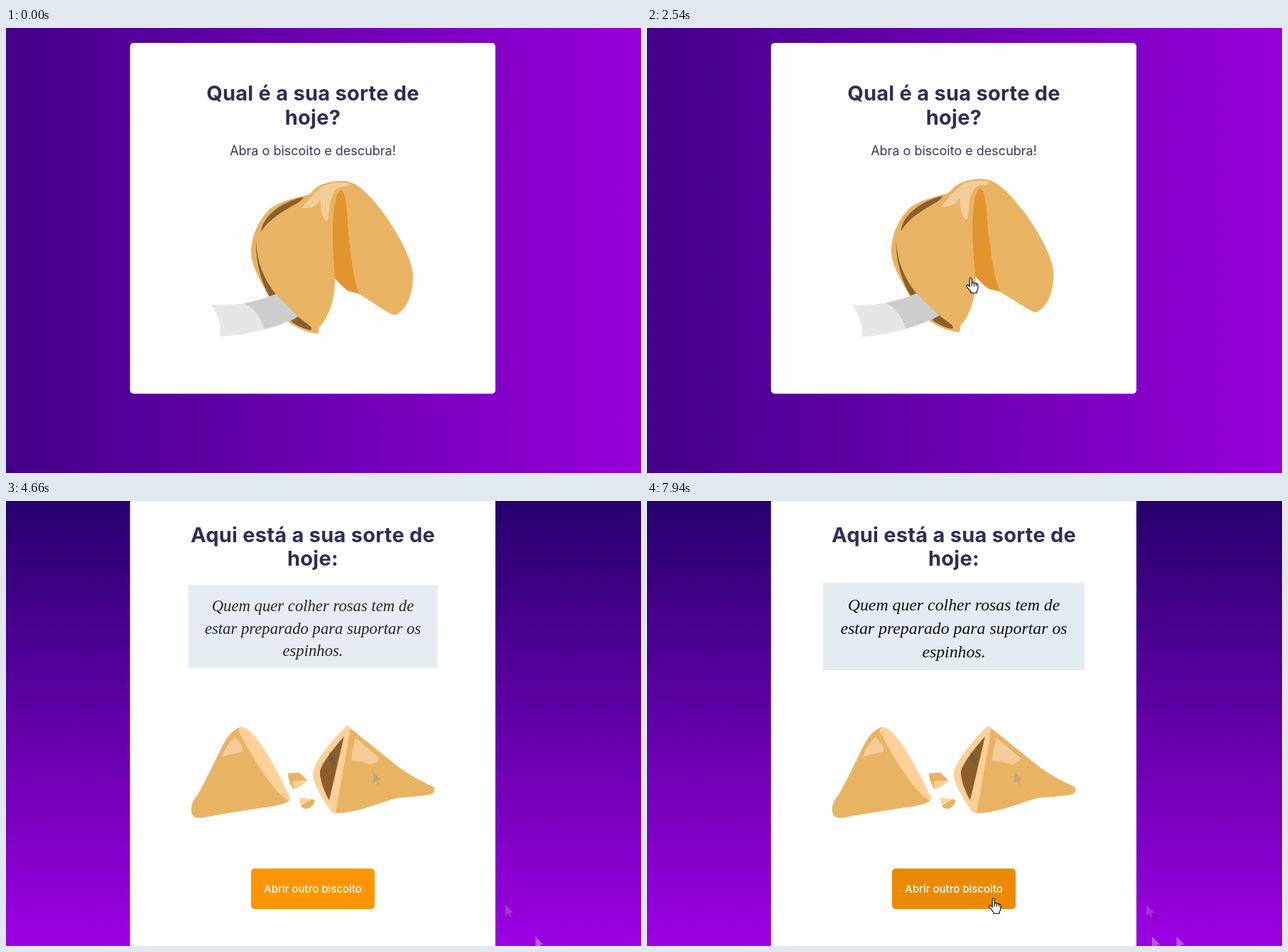
Recreate the animation shown at these times as an HTML page. Size 894 px wide and 626 px high, loop 8 s.

```html
<!DOCTYPE html>
<html lang="pt">
<head>
<meta charset="utf-8">
<title>Biscoito da sorte</title>
<style>
  html, body { margin: 0; width: 100%; height: 100%; overflow: hidden; }
  svg { display: block; }
  text { text-anchor: middle; font-family: Inter, "Open Sans", sans-serif; }
  .title { font-size: 29px; font-weight: 700; letter-spacing: .25px; fill: #2d2d55; }
  .sub { font-size: 18px; fill: #37375c; }
  .label { font-size: 15px; font-weight: 500; fill: #fff; }
  .quote { font: italic 23.8px "Liberation Serif", serif; fill: #111; }
  .dough { fill: #e9b364; }
  .rim { fill: #ffd199; }
  .shine { fill: #f3cc98; }
  .inside { fill: #8c5f2a; }
</style>
</head>
<body>
<svg width="894" height="626" viewBox="0 0 894 626">
  <defs>
    <linearGradient id="across">
      <stop stop-color="#420088"/><stop offset="1" stop-color="#9600da"/>
    </linearGradient>
    <linearGradient id="down" x2="0" y2="1">
      <stop stop-color="#26006c"/><stop offset="1" stop-color="#9d00e3"/>
    </linearGradient>
    <path id="arrow" d="M0 0V16.2L3.7 12.7L6.3 18.6L8.8 17.5L6.2 11.8H11.3Z"/>
  </defs>

  <rect id="backdrop" width="894" height="626"/>

  <g id="closed">
    <rect x="174.6" y="21" width="514.4" height="493.5" rx="5" fill="#fefefe"/>
    <text class="title" x="432" y="102">Qual é a sua sorte de</text>
    <text class="title" x="432" y="135.5">hoje?</text>
    <text class="sub" x="432" y="179">Abra o biscoito e descubra!</text>
    <g id="cookie">
      <path class="dough" d="M424 235C400 240 379 247 370 256C352 275 345 297 345 316C346 338 363 364 371 379L398 414C408 421 424 429 438 430Q441 429 440 422C450 412 464 388 463 352L497 374C520 388 538 402 548 404C566 395 573 373 573 348C571 318 540 268 515 240C500 224 489 215 472 215C455 215 440 220 432 229Q428 234 424 235Z"/>
      <path fill="#e2942d" d="M472 228C466 228 460 250 460 290C460 320 463 345 463 352C470 360 477 367 482 370C488 372 492 372 497 374C488 350 486 320 482 290C480 262 480 232 472 228Z"/>
      <path class="shine" d="M416 253C428 240 438 226 452 220C462 216 478 217 484 219Q485 223 472 224C462 226 460 234 457 245C454 260 455 268 452 272C444 268 443 255 443 241C438 248 434 255 416 253Z"/>
      <path class="inside" d="M419 238C400 241 362 258 359 287C370 268 396 254 411 246Q417 242 419 238ZM352 299C351 325 358 355 371 378L380 375C362 352 353 328 352 299ZM401 412L411 406L429 420Q432 425 428 425C418 423 408 418 401 412Z"/>
      <path fill="#e6e6e5" d="M289 389C305 390 321 389 336 387C350 393 358 405 364 424C342 430 322 433 301 434C304 418 298 402 289 389Z"/>
      <path fill="#cdcdcd" d="M336 387C352 384 366 380 380 374L411 406C396 414 380 420 364 424C358 405 350 395 336 387Z"/>
    </g>
  </g>

  <g id="opened">
    <rect x="174.6" width="514.4" height="626" fill="#fff"/>
    <text class="title" x="432" y="57.5">Aqui está a sua sorte de</text>
    <text class="title" x="432" y="91">hoje:</text>
    <path class="dough" d="M331 318C319 321 311 332 304 346C293 368 282 392 270 413C262 422 260 430 261 438Q263 447 274 446C305 440 345 434 372 430Q398 426 400 419Z"/>
    <path class="rim" d="M331 318C347 317 372 359 400 417Q400 420 397 421C378 410 352 370 328 325Q328 319 331 318Z"/>
    <path class="shine" d="M322 332Q307 346 304 361C312 356 326 356 333 352C335 346 328 338 322 332Z"/>
    <path class="dough" d="M397 383L413 382L424 393Q414 404 404 405Q397 393 397 383Z"/>
    <path class="rim" d="M404 394L424 393Q414 403 405 404ZM413 418Q424 417 435 422Q430 433 423 433Q414 432 413 418Z"/>
    <path class="dough" d="M415 429L431 419L435 422Q430 433 423 433Q418 433 415 429Z"/>
    <path class="dough" d="M484 319L551 373C570 387 590 397 602 402C605 407 603 411 597 413C580 416 565 416 550 418C525 424 495 440 460 439Z"/>
    <path class="rim" d="M480 316L485 319L464 439Q460 440 457 436C446 420 431 397 432 382C434 366 460 335 480 316Z"/>
    <path class="inside" d="M476 331L455 421C448 410 441 390 442 380C445 368 462 347 476 331Z"/>
    <path class="shine" d="M492 333L526 362C522 370 514 372 508 369C500 366 493 365 486 366Q487 350 492 333Z"/>
    <g id="fortune">
      <rect x="248" y="115" width="368" height="123" fill="#e3ecf1"/>
      <text class="quote" x="432" y="154">Quem quer colher rosas tem de</text>
      <text class="quote" x="432" y="187">estar preparado para suportar os</text>
      <text class="quote" x="432" y="220">espinhos.</text>
    </g>
    <rect id="button" x="345" y="517" width="174" height="57" rx="5"/>
    <text class="label" x="432" y="551">Abrir outro biscoito</text>
  </g>

  <g id="trail"></g>
  <g id="pointer" fill="#fff" stroke="#000" stroke-linejoin="round">
    <use id="plain" href="#arrow" stroke-width=".9"/>
    <path id="hand" stroke-width="1.1" d="M-.8 1C-.8-1 2.2-1 2.3 1V7C2.6 5.6 5.3 5.7 5.5 7.4C6 6.3 8.2 6.5 8.4 8C9.2 7.3 10.8 7.8 10.9 9.3V14C10.9 16 9.5 17.4 9.3 18.6V20.8H1V18.8C-.8 17-3 14.2-5 11.8C-6.4 9.6-4 8.6-2.6 10L-.8 12ZM2.3 7V11M5.5 7.4V11M8.4 8V11.2"/>
  </g>
</svg>
<script>
const LOOP = 8000, SHAKE_START = 937, SHAKE_CYCLE = 517;
const OPEN = 3150, TURN = 3610, REVEAL = 3710, HOVER = 7660;

// x, y, degrees; a step every tenth of a cycle
const shake = [
  [1, 1, 0], [-1, -2, -1], [-3, 0, 1], [3, 2, 0], [1, -1, 1], [-1, 2, -1],
  [-3, 1, 0], [3, 1, -1], [-1, -1, 1], [1, 2, 0], [1, -2, -1]
];
// time, x, y
const visits = [
  [[660, 851, 557], [937, 552, 396], [1200, 455, 352], [3810, 455, 352],
   [3890, 517, 381], [4090, 703, 568], [4230, 746, 615], [4300, 762, 640]],
  [[7050, 711, 613], [7400, 640, 602], [HOVER, 519, 572], [7870, 487, 559.5], [LOOP, 487, 559.5]]
];
// shown from, x, y, colour, opacity
const marks = [
  [3850, 455, 352, "#555", .4], [3950, 517, 381, "#999", .45],
  [4150, 703, 567.5, "#b890c4", .36], [4300, 745.5, 612.5, "#c8a4d2", .55],
  [7120, 711, 612.5, "#c8a4d2", .55]
];

const $ = id => document.getElementById(id);
const clamp = v => Math.min(1, Math.max(0, v));
const mix = (a, b, p) => a.map((v, i) => v + (b[i] - v) * p);
const show = (el, on) => el.setAttribute("visibility", on ? "inherit" : "hidden");

const bezier = (a, b, u) => 3 * a * u * (1 - u) ** 2 + 3 * b * u * u * (1 - u) + u ** 3;
function ease(x) {
  let low = 0, high = 1;
  for (let i = 0; i < 24; i++) {
    const mid = (low + high) / 2;
    if (bezier(.25, .25, mid) < x) low = mid; else high = mid;
  }
  return bezier(.1, 1, low);
}

const trail = marks.map(([from, x, y, fill, opacity]) => {
  const el = document.createElementNS("http://www.w3.org/2000/svg", "use");
  const attrs = { href: "#arrow", x, y, fill, opacity };
  for (const key in attrs) el.setAttribute(key, attrs[key]);
  $("trail").append(el);
  return { el, from };
});

function shakePose(t) {
  if (t < SHAKE_START) return [0, 0, 0];
  const step = (t - SHAKE_START) / SHAKE_CYCLE % 1 * 10, i = Math.floor(step);
  return mix(shake[i], shake[i + 1], ease(step - i));
}

function pointerAt(t) {
  const path = visits.find(v => t >= v[0][0] && t < v.at(-1)[0]);
  if (!path) return null;
  const i = path.findIndex(p => p[0] > t), a = path[i - 1], b = path[i];
  return mix(a, b, (t - a[0]) / (b[0] - a[0])).slice(1);
}

function draw(t) {
  const open = t >= OPEN;
  $("backdrop").setAttribute("fill", t < TURN ? "url(#across)" : "url(#down)");
  show($("closed"), !open);
  show($("opened"), open);

  const [x, y, angle] = shakePose(t);
  $("cookie").setAttribute("transform", `translate(${x} ${y}) rotate(${angle} 432 325)`);

  const reveal = ease(clamp((t - REVEAL) / 1500));
  $("fortune").setAttribute("opacity", reveal);
  $("fortune").setAttribute("transform",
    `translate(432 176.5) scale(${.5 + reveal / 2}) translate(-432 -176.5)`);

  const shade = mix([255, 149, 0], [235, 138, 0], clamp((t - HOVER) / 250));
  $("button").setAttribute("fill", `rgb(${shade.map(Math.round)})`);

  trail.forEach(({ el, from }) => show(el, t >= from));
  const spot = pointerAt(t);
  show($("pointer"), spot);
  if (spot) $("pointer").setAttribute("transform", `translate(${spot})`);
  const overLink = t >= SHAKE_START && !open || t >= HOVER;
  show($("hand"), overLink);
  show($("plain"), !overLink);
}

const start = performance.now();
function tick() {
  draw((performance.now() - start) % LOOP);
  requestAnimationFrame(tick);
}
tick();
</script>
</body>
</html>
```
